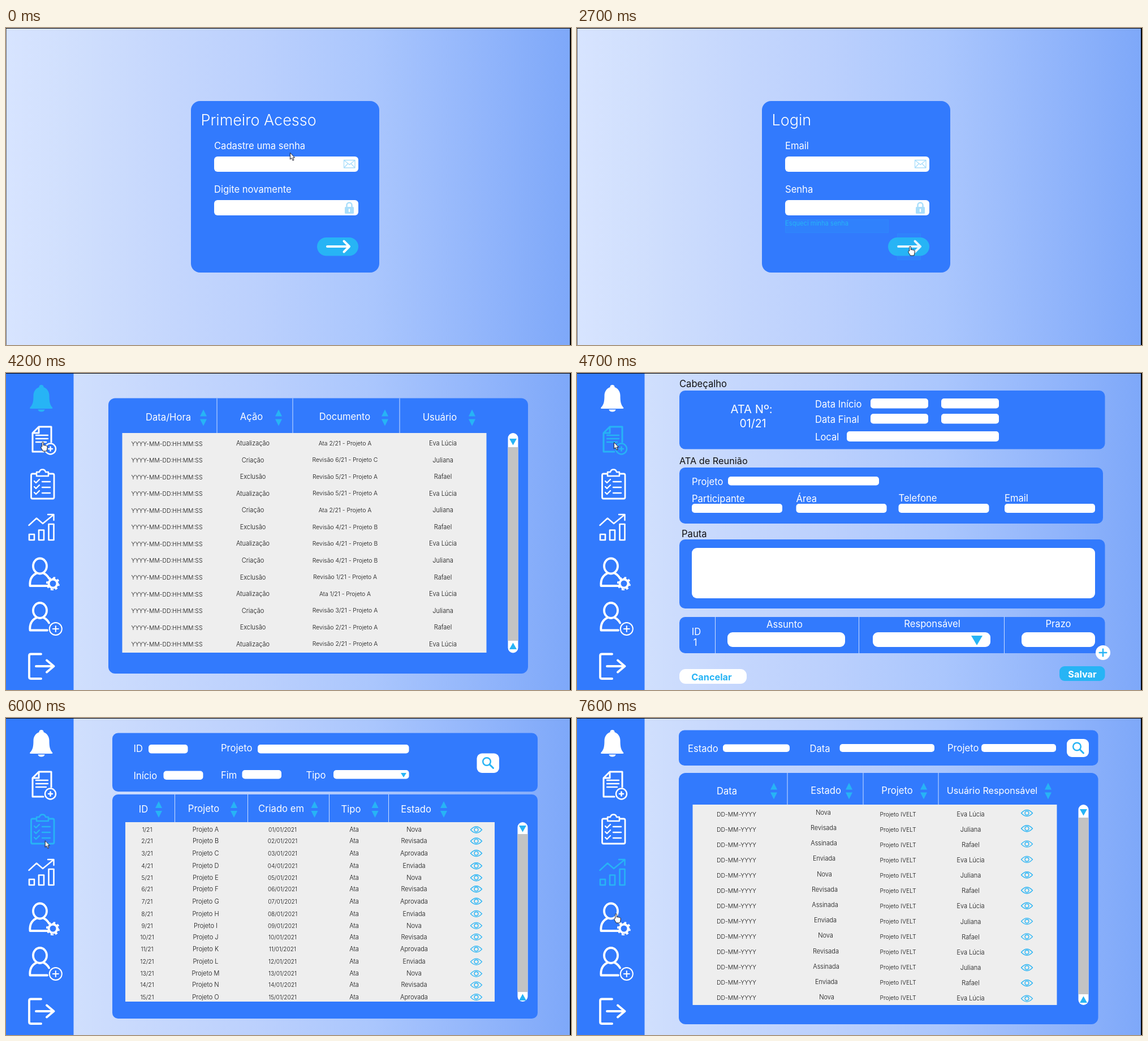
Write an HTML page that moves like this. It is 999 px wide and 560 px high and loops after 8 s.

```html
<!DOCTYPE html>
<html lang="pt">
<head>
<meta charset="utf-8">
<title>Atas de reunião</title>
<style>
html, body { margin: 0; width: 100%; height: 100%; overflow: hidden; background: #000; }
svg { display: block; width: 100%; height: 100%; }
text { font-family: Inter, "Open Sans", sans-serif; white-space: pre; }
.line { fill: none; stroke: currentColor; stroke-linecap: round; stroke-linejoin: round; }

.page { visibility: hidden; animation: 8s step-end infinite; }
#first  { animation-name: first; }
#login  { animation-name: login; }
#log    { animation-name: log; }
#minute { animation-name: minute; }
#search { animation-name: search; }
#report { animation-name: report; }
@keyframes first  { 0% { visibility: visible } 20% { visibility: hidden } }
@keyframes login  { 20% { visibility: visible } 36.25% { visibility: hidden } }
@keyframes log    { 36.25% { visibility: visible } 58.75% { visibility: hidden } }
@keyframes minute { 58.75% { visibility: visible } 75% { visibility: hidden } }
@keyframes search { 75% { visibility: visible } 88.75% { visibility: hidden } }
@keyframes report { 88.75%, 100% { visibility: visible } }

.hint { opacity: 0; animation: hint 8s step-end infinite; }
@keyframes hint {
  31.25% { opacity: .4 } 32.5% { opacity: .75 } 33.75% { opacity: 1 } 36.25% { opacity: 0 }
}

#pointer { animation: move 8s step-end infinite; }
@keyframes move {
  0%     { transform: translate(502px, 220px) }
  1.25%  { transform: translate(502px, 220px); animation-timing-function: steps(3, jump-both) }
  5%     { transform: translate(623px, 386px) }
  8.75%  { transform: translate(623px, 386px); animation-timing-function: steps(1, jump-both) }
  10%    { transform: translate(608px, 386px) }
  27.5%  { transform: translate(608px, 386px); animation-timing-function: steps(3, jump-both) }
  31.25% { transform: translate(589px, 386px) }
  42.5%  { transform: translate(589px, 386px); animation-timing-function: steps(3, jump-both) }
  46.25% { transform: translate(1px, 110px) }
  47.5%  { transform: translate(1px, 110px); animation-timing-function: steps(2, jump-both) }
  50%    { transform: translate(60px, 49px) }
  51.25% { transform: translate(60px, 49px); animation-timing-function: steps(1, jump-both) }
  52.5%  { transform: translate(65px, 122px) }
  62.5%  { transform: translate(65px, 122px); animation-timing-function: steps(2, jump-both) }
  65%    { transform: translate(70px, 194px) }
  75%    { transform: translate(70px, 194px); animation-timing-function: steps(3, jump-both) }
  78.75% { transform: translate(65px, 283px) }
  92.5%  { transform: translate(65px, 283px); animation-timing-function: steps(2, jump-both) }
  95%, 100% { transform: translate(69px, 346px) }
}
#arrow { animation: arrow 8s step-end infinite; }
#hand { animation: hand 8s step-end infinite; }
@keyframes arrow {
  0%, 20%, 36.25%, 58.75%, 75%, 88.75% { opacity: 1 }
  12.5%, 27.5%, 52.5%, 65%, 78.75%, 95%, 100% { opacity: 0 }
}
@keyframes hand {
  0%, 20%, 36.25%, 58.75%, 75%, 88.75% { opacity: 0 }
  12.5%, 27.5%, 52.5%, 65%, 78.75%, 95%, 100% { opacity: 1 }
}
</style>
</head>
<body>
<svg viewBox="0 0 999 560" preserveAspectRatio="none">
  <defs>
    <linearGradient id="sky">
      <stop offset="0" stop-color="#d7e4ff"/>
      <stop offset=".12" stop-color="#d0dffd"/>
      <stop offset=".3" stop-color="#c4d6fd"/>
      <stop offset=".45" stop-color="#bbd0fd"/>
      <stop offset=".65" stop-color="#aac6fd"/>
      <stop offset=".86" stop-color="#90b4fb"/>
      <stop offset="1" stop-color="#7ea8f9"/>
    </linearGradient>
  </defs>
  <rect width="999" height="560"/>
  <rect x=".5" y="1" width="996.5" height="559" fill="url(#sky)"/>
  <g id="first" class="page"></g>
  <g id="login" class="page"></g>
  <g id="log" class="page"></g>
  <g id="minute" class="page"></g>
  <g id="search" class="page"></g>
  <g id="report" class="page"></g>
  <g id="pointer" fill="#fff" stroke="#1c1c2c" stroke-linejoin="round">
    <path id="arrow" d="M.4 .5V12L3 9.6 5 14 7 13.2 5.1 9H8.6Z"/>
    <path id="hand" d="M-1.2 8V1.2a1.3 1.3 0 0 1 2.6 0V6c.6-1 2.3-.8 2.4.3.6-.8 2.2-.5 2.3.6.7-.6 2-.2 2 1V11c0 2-1.3 3-1.3 5H.2c0-2-3.2-4-3.4-7 0-1 1.3-1.5 2-1Z"/>
  </g>
</svg>
<script>
const BLUE = '#327afd', CYAN = '#27b4f5', PALE = '#a9defb';
const PEOPLE = ['Eva Lúcia', 'Juliana', 'Rafael'];

// Boxes are given by their left, top, right and bottom edges.
const box = (x, y, x2, y2, r = 0, fill = '#fff') =>
  `<rect x="${x}" y="${y}" width="${x2 - x}" height="${y2 - y}" rx="${r}" fill="${fill}"/>`;
const text = (x, y, s, { size = 16.6, fill = '#fff', anchor = 'start', weight = 400 } = {}) =>
  `<text x="${x}" y="${y}" font-size="${size}" fill="${fill}" text-anchor="${anchor}" font-weight="${weight}">${s}</text>`;
const mid = (x, y, s, opt) => text(x, y, s, { anchor: 'middle', ...opt });
const cell = (x, y, s, size = 11) => mid(x, y + 3.8, s, { size, fill: '#111', weight: 350 });
const line = (d, width, color = 'currentColor') =>
  `<path class="line" d="${d}" stroke-width="${width}" style="color:${color}"/>`;
const ring = (x, y, r, width) => `<circle class="line" cx="${x}" cy="${y}" r="${r}" stroke-width="${width}"/>`;
const plus = (x, y, r, width, color) => line(`M${x - r} ${y}h${2 * r}M${x} ${y - r}v${2 * r}`, width, color);
// A negative height makes the triangle point up.
const tri = (x, y, w, h) => `<path d="M${x - w / 2} ${y}h${w}l${-w / 2} ${h}z" fill="${CYAN}"/>`;
const sort = (x, y) => tri(x, y + 12, 12, -12) + tri(x, y + 17, 12, 12);
const dividers = (xs, y, y2) => line(xs.map(x => `M${x} ${y}V${y2}`).join(''), 1, '#cfe0ff');
const eye = (x, y) => `<g transform="translate(${x} ${y})" color="${CYAN}">` +
  line('M-10 0Q0 -11 10 0Q0 11 -10 0Z', 1.4) + ring(0, 0, 3.4, 1.4) + '</g>';
const lens = (x, y) => `<g color="${CYAN}">${ring(x, y, 6.8, 2.5)}${line(`M${x + 5} ${y + 5}l6.5 6.5`, 3)}</g>`;
const rows = (n, fn) => Array.from({ length: n }, (_, i) => fn(i)).join('');
const fill = (id, ...parts) => document.getElementById(id).innerHTML = parts.join('');

function scrollbar(x, y, y2, top, bottom) {
  const c = x + 9;
  return box(x, y, x + 18, y2, 9) + box(x, top, x + 18, bottom, 0, '#c3c3c3') +
    tri(c, top - 15, 13, 11.5) + tri(c, bottom + 15, 13, -11.5);
}

const person = y =>
  `<ellipse class="line" cx="60" cy="${y}" rx="12" ry="13.5" stroke-width="3.8"/>` +
  line(`M73 ${y + 35}H42.500c-1-11 3-18 11-22M67 ${y + 13}c4 2 7 5 9 9`, 3.8);

const ICONS = [
  `<g fill="currentColor"><path d="M62.500 21a4 4 0 0 1 4 4c6 2 10 8 10 15 0 10 1 16 5.500 21 1 1 0 2-1 2H43.500c-1 0-2-1-1-2 5-5 6-11 6-21 0-7 4-13 10-15a4 4 0 0 1 4-4z"/>
   <path d="M56.500 64.500h12a6 4 0 0 1-12 0z"/></g>`,
  line('M66 139H47V106L58 95H80V122M58 96V106H48', 3) +
    line('M53 110H74M53 116H74M53 122H71', 2.4) + ring(78.5, 134, 9.5, 2.4) + plus(78.5, 134, 3.5, 2.6),
  line('M54 178H47q-2.500 0-2.500 2.500V219.500q0 2.500 2.500 2.500H82.500q2.500 0 2.500-2.500V180.500q0-2.500-2.500-2.500H75', 2.8) +
    line('M54 175H59q1-4.500 5.500-4.500T70 175H75V182H54Z', 2.4) +
    line([191, 201, 211].map(y => `M50 ${y}l3 3 6-6M64 ${y + 1}H78`).join(''), 2.4),
  line('M41 285H50V295H41ZM58 277.500H67V295H58ZM75.500 267H84.500V295H75.500Z', 2.6) +
    line('M40.500 269L54 256.500 65 266 84 250.500M74 250H84.500V260', 2.4),
  person(341) + ring(83, 372, 7.5, 4) +
    `<circle cx="83" cy="372" r="10.300" fill="none" stroke="currentColor" stroke-width="3.600" pathLength="16" stroke-dasharray="1"/>`,
  person(419.5) + ring(87.8, 452, 11, 2) + plus(87.8, 452, 5, 2),
  line('M62 496.500H44q-3 0-3 3V537q0 3 3 3H62M53 518H84M72 507.500L84.500 518 72 528.500', 3.8),
];

const sidebar = active => box(0, 1, 119.5, 560, 0, BLUE) +
  ICONS.map((d, i) => `<g color="${i === active ? CYAN : '#fff'}">${d}</g>`).join('');

const card = (title, label1, label2, extra = '') => [
  box(327, 129, 660, 432, 16, BLUE),
  text(344.5, 172, title, { size: 27, weight: 350 }),
  text(368, 214, label1), text(368, 291, label2),
  box(368, 227, 623, 254, 6), box(368, 304, 623, 331, 6),
  line('M597.500 233.500H617V247H597.500ZL607.300 241.500 617 233.500M597.500 247L604.500 239.500M617 247L610 239.500', 1.3, PALE),
  box(599, 316, 615, 328, 1.5, PALE),
  line('M602.500 316V313a4.500 4.500 0 0 1 9 0V316', 2.5, PALE),
  line('M607 320.500V324', 2.4, '#fff'),
  box(550, 370, 623, 402.5, 16.3, CYAN),
  line('M568 386H606M597.500 376.500L607 386 597.500 395.500', 4, '#fff'),
  extra,
].join('');

const hint = (x, y, x2, y2) =>
  `<rect class="hint" x="${x}" y="${y}" width="${x2 - x}" height="${y2 - y}" fill="${CYAN}" fill-opacity=".13" stroke="${CYAN}" stroke-opacity=".2"/>`;

fill('first', card('Primeiro Acesso', 'Cadastre uma senha', 'Digite novamente'));
fill('login', card('Login', 'Email', 'Senha',
  hint(368.5, 338.5, 550.5, 361.5) + hint(566.5, 363.5, 607.5, 409.5) +
  text(368, 349, 'Esqueci minha senha', { size: 11.2, fill: CYAN })));

const ACTIONS = ['Atualização', 'Criação', 'Exclusão'];
const DOCS = 'A2A R6C R5A R5A A2A R4B R4B R4B R1A A1A R3A R2A R2A'.split(' ')
  .map(([kind, n, p]) => `${kind === 'A' ? 'Ata' : 'Revisão'} ${n}/21 - Projeto ${p}`);
fill('log', sidebar(0),
  box(181, 44.5, 923, 531, 12, BLUE), box(205.5, 106, 849.5, 494, 0, '#eee'),
  dividers([373, 507, 696], 45, 106),
  mid(287, 84, 'Data/Hora'), mid(434, 83, 'Ação'), mid(599, 83, 'Documento'), mid(767, 84, 'Usuário'),
  [349, 482, 670, 824].map(x => sort(x, 64.5)).join(''),
  scrollbar(887.5, 106, 494.5, 131, 473),
  rows(13, i => {
    const y = 124.3 + 29.55 * i;
    return cell(284.5, y + .5, 'YYYY-MM-DD:HH:MM:SS', 10.4) + cell(436.5, y, ACTIONS[i % 3]) +
      cell(599.5, y - .3, DOCS[i], 10.4) + cell(772.5, y, PEOPLE[i % 3]);
  }));

const dark = { fill: '#111' }, bold = { weight: 700, size: 16.3 };
fill('minute', sidebar(1),
  text(181, 24.5, 'Cabeçalho', dark), box(181, 31, 933.5, 134.5, 10, BLUE),
  mid(308.5, 71, 'ATA Nº:', { size: 20.3 }), mid(311, 96, '01/21', { size: 19.5 }),
  text(421, 60.5, 'Data Início'), text(421, 88, 'Data Final'), text(421, 118.5, 'Local'),
  [45, 72].map(y => box(519, y, 621, y + 17.5, 5) + box(644, y, 746, y + 17.5, 5)).join(''),
  box(477, 103, 746, 121, 5),
  text(181, 160.5, 'ATA de Reunião', { fill: '#111', size: 16.3 }), box(181, 167, 930, 266, 10, BLUE),
  text(203, 198, 'Projeto'), box(267, 183, 534, 198.5, 5),
  [['Participante', 203, 228], ['Área', 387.5, 228], ['Telefone', 568.5, 227], ['Email', 756, 226.5]]
    .map(([s, x, y]) => text(x, y, s) + box(x, 231, x + 160, 247, 5)).join(''),
  text(185, 290, 'Pauta', dark), box(181, 294, 933.5, 416, 10, BLUE), box(203, 309, 916, 398, 9),
  box(181, 431, 933.5, 495, 10, BLUE), dividers([244.5, 498.5, 755.5], 431, 495),
  mid(211, 462.5, 'ID'), mid(209, 481.5, '1'),
  mid(367, 449.5, 'Assunto'), mid(628, 449, 'Responsável'), mid(851, 449, 'Prazo'),
  box(266, 458, 474, 484, 9), box(523, 458, 731, 484, 9), box(786, 458, 916, 484, 9),
  tri(707, 464, 20, 17),
  '<circle cx="930" cy="494" r="13" fill="#fff"/>', plus(930, 494, 6.3, 2.5, CYAN),
  box(181, 523, 300, 549, 11), mid(238, 543, 'Cancelar', { ...bold, fill: CYAN }),
  box(853, 518, 933.5, 544, 9, CYAN), mid(893.5, 537.5, 'Salvar', bold));

const STATES = ['Nova', 'Revisada', 'Aprovada', 'Enviada'];
fill('search', sidebar(2),
  box(188, 26.5, 940, 130, 10, BLUE), box(188, 135, 940, 531, 10, BLUE),
  text(225.5, 60, 'ID'), box(252, 47, 321.5, 62.5, 5),
  text(380, 59, 'Projeto'), box(445, 47, 712.5, 62.5, 5),
  text(225.5, 107.5, 'Início'), box(278.5, 93.5, 348.5, 109, 5),
  text(380, 106.5, 'Fim'), box(417.5, 92, 487, 107.5, 5),
  text(530.5, 106.5, 'Tipo'), box(579, 92, 712.5, 107.5, 5), tri(703, 97, 10, 8),
  box(832.5, 62.5, 872, 97, 9), lens(850, 77),
  box(211, 184, 864, 501, 0, '#eee'), dividers([298.5, 427.5, 571.5, 676.5], 135, 184),
  mid(243, 167, 'ID'), mid(349.5, 165.5, 'Projeto'), mid(486.5, 165.5, 'Criado em'),
  mid(610, 167, 'Tipo'), mid(725, 167, 'Estado'),
  [270, 403, 545.5, 652.5, 774].map(x => sort(x, 147)).join(''),
  scrollbar(904.5, 184, 501, 205, 484),
  rows(15, i => {
    const y = 197.5 + 84.7 * Math.floor(i / 4) + [0, 20, 41.5, 63.7][i % 4];
    const day = String(i + 1).padStart(2, '0');
    return cell(249.5, y, `${i + 1}/21`, 10.3) + cell(353, y, 'Projeto ' + String.fromCharCode(65 + i)) +
      cell(489, y, `${day}/01/2021`, 10.1) + cell(615.5, y, 'Ata') +
      cell(721.5, y, STATES[i % 4]) + eye(831.5, y);
  }));

const REPORT_STATES = ['Nova', 'Revisada', 'Assinada', 'Enviada'];
fill('report', sidebar(3),
  box(180, 21.5, 921.5, 84, 10, BLUE), box(180, 97, 921.5, 541, 12, BLUE),
  text(196, 59.5, 'Estado'), box(258, 46.5, 376, 60, 5),
  text(411.5, 59.5, 'Data'), box(464.5, 46, 632, 60, 5),
  text(655, 58.5, 'Projeto'), box(715, 46, 847, 60, 5),
  box(866, 37, 905, 69, 9), lens(884, 50.5),
  box(204.5, 153, 848.5, 507, 0, '#eee'), dividers([372, 506, 639], 97, 153),
  mid(265, 134.5, 'Data'), mid(440, 133.5, 'Estado'), mid(566, 133.5, 'Projeto'),
  mid(734, 133.5, 'Usuário Responsável', { size: 16.2 }),
  [348, 481, 613, 833].map(x => sort(x, 114.5)).join(''),
  scrollbar(886.5, 153, 507, 176, 488),
  rows(13, i => {
    const y = 170 + 27 * i;
    return cell(282, y, 'DD-MM-YYYY', 10.4) + cell(435.5 + .5 * i, 167 + 27.2 * i, REPORT_STATES[i % 4]) +
      cell(567.5, y, 'Projeto IVELT', 10.4) + cell(696, 170 + 27.1 * i, PEOPLE[i % 3]) +
      eye(795.5, 168 + 27.3 * i);
  }));
</script>
</body>
</html>
```
